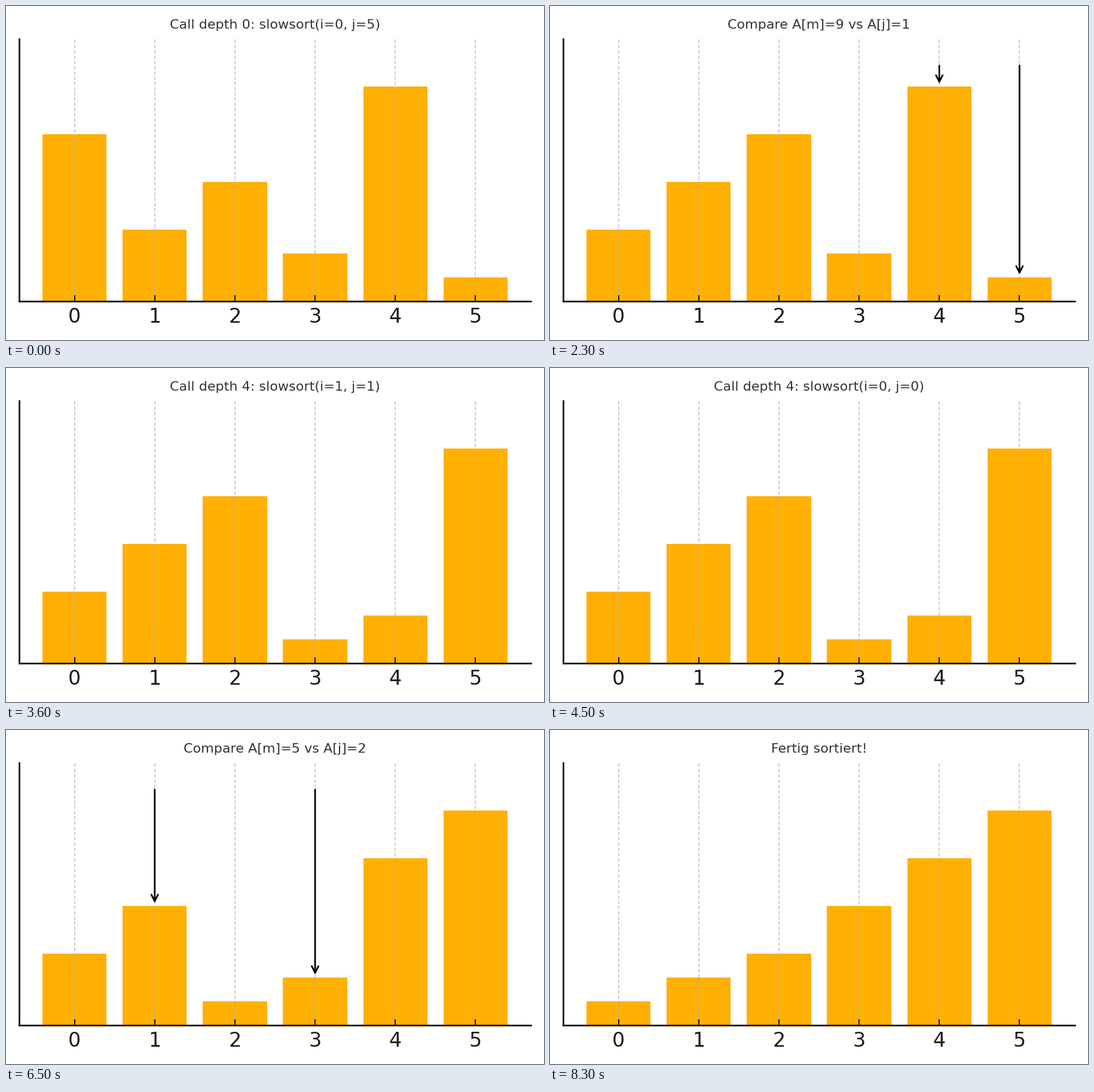
A matplotlib script for the animation above (8.4 s loop, 900 px wide and 560 px high).

```python
import matplotlib.pyplot as plt
from matplotlib.animation import FuncAnimation
from matplotlib.patches import FancyArrowPatch

WIDTH, HEIGHT, DPI = 900, 560, 100
VALUES = [7, 3, 5, 2, 9, 1]
STEP_MS = 100
ARROW_TOP = 9.95
ARROW_GAP = 0.05
INK = "#1a1a1a"

plt.rcParams["font.family"] = "DejaVu Sans"


def slowsort(a, i, j, depth=0):
    """Yield (values, marked indices, caption) for every step."""
    yield a[:], (), f"Call depth {depth}: slowsort(i={i}, j={j})"
    if i >= j:
        return
    m = (i + j) // 2
    yield from slowsort(a, i, m, depth + 1)
    yield from slowsort(a, m + 1, j, depth + 1)
    yield a[:], (m, j), f"Compare A[m]={a[m]} vs A[j]={a[j]}"
    if a[m] > a[j]:
        a[m], a[j] = a[j], a[m]
        yield a[:], (m, j), "Swap → größtes Element ans Ende"
    yield from slowsort(a, i, j - 1, depth + 1)


steps = list(slowsort(VALUES[:], 0, len(VALUES) - 1))
steps.append((sorted(VALUES), (), "Fertig sortiert!"))

fig, ax = plt.subplots(figsize=(WIDTH / DPI, HEIGHT / DPI), dpi=DPI,
                       facecolor="white")
fig.subplots_adjust(left=22 / WIDTH, right=878 / WIDTH,
                    bottom=65 / HEIGHT, top=505 / HEIGHT)
bars = ax.bar(range(len(VALUES)), VALUES, color="#ffb000")
title = ax.set_title(steps[0][2], fontsize=16, color="#333333", pad=12)

ax.set_ylim(0, 11)
ax.set_yticks([])
ax.set_xticks(range(len(VALUES)))
ax.tick_params(axis="x", direction="in", length=7, width=1.5, pad=7,
               labelsize=24, color=INK, labelcolor=INK)
ax.grid(axis="x", linestyle="--", linewidth=1.2, color="#b0b0b0", alpha=0.7)
for side in ("top", "right"):
    ax.spines[side].set_visible(False)
for side in ("left", "bottom"):
    ax.spines[side].set(linewidth=2, color=INK)

arrows = [
    FancyArrowPatch((0, ARROW_TOP), (0, 1), arrowstyle="->", linewidth=2,
                    mutation_scale=20, color="black", zorder=3, visible=False)
    for _ in range(2)
]
for arrow in arrows:
    ax.add_patch(arrow)


def draw(n):
    values, marked, caption = steps[n]
    for bar, value in zip(bars, values):
        bar.set_height(value)
    for arrow in arrows:
        arrow.set_visible(False)
    for arrow, k in zip(arrows, marked):
        arrow.set_positions((k, ARROW_TOP), (k, values[k] + ARROW_GAP))
        arrow.set_visible(True)
    title.set_text(caption)
    return [*bars, *arrows, title]


anim = FuncAnimation(fig, draw, frames=len(steps), interval=STEP_MS,
                     init_func=lambda: draw(0), repeat=True, repeat_delay=0)
plt.show()
```
